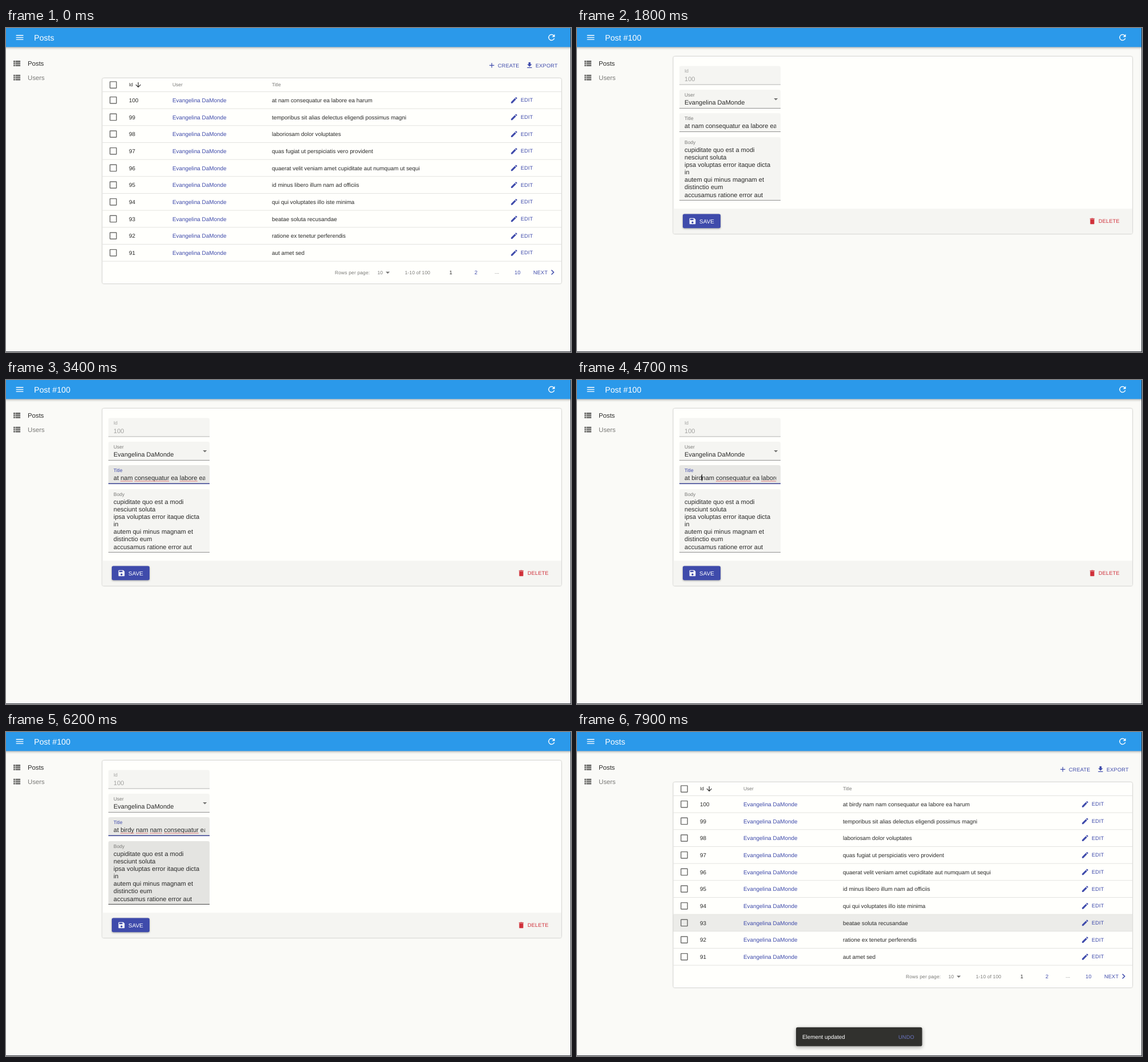
Animation of 988 by 567 pixels, one loop 8 s. Source, as an HTML page:

```html
<!DOCTYPE html>
<html lang="en">
<head>
<meta charset="utf-8">
<title>Posts admin</title>
<style>
  html, body { margin: 0; width: 100%; height: 100%; overflow: hidden; background: #fafaf7; }
  svg { display: block; width: 988px; height: 567px; }
  text {
    font-family: "Liberation Sans", Arial, sans-serif;
    text-rendering: geometricPrecision;
    white-space: pre;
  }
  .h6 { font-size: 14.1px; }
  .menu { font-size: 11.3px; }
  .cell { font-size: 9.9px; }
  .input { font-size: 11.03px; }
  .label { font-size: 8.48px; }
  .caption { font-size: 8.48px; letter-spacing: .14px; }
  .button { font-size: 9.19px; letter-spacing: .19px; }
  .save { font-size: 9.9px; letter-spacing: .1px; }
  .status { font-family: "Open Sans", "Noto Sans", sans-serif; font-size: 9.6px; }
  .bar { filter: drop-shadow(0 1.4px 2px rgba(0, 0, 0, .36)); }
  .paper { filter: drop-shadow(0 .8px .9px rgba(0, 0, 0, .36)); }
  .raised { filter: drop-shadow(0 1.3px 1.4px rgba(0, 0, 0, .36)); }
  .float { filter: drop-shadow(0 2px 3px rgba(0, 0, 0, .36)); }
</style>
</head>
<body>
<svg id="stage" viewBox="0 0 988 567" xmlns="http://www.w3.org/2000/svg"></svg>
<script>
const LOOP = 8000, STEP = 100;
const OPEN = 1700, SAVED = 7700;
const INK = '#2b2b2a', GREY = '#7a7a78', PALE = '#a3a3a0', PAPER = '#fffffc';
const INDIGO = '#3f4bab', RED = '#d0303a', WHITE = '#fff';
const USER = 'Evangelina DaMonde';
const TAIL = 'nam consequatur ea labore ea harum';
const TYPED = 'birdy nam ';
const TITLES = [
  'at ' + TAIL,
  'temporibus sit alias delectus eligendi possimus magni',
  'laboriosam dolor voluptates',
  'quas fugiat ut perspiciatis vero provident',
  'quaerat velit veniam amet cupiditate aut numquam ut sequi',
  'id minus libero illum nam ad officiis',
  'qui qui voluptates illo iste minima',
  'beatae soluta recusandae',
  'ratione ex tenetur perferendis',
  'aut amet sed'
];
const BODY = [
  'cupiditate quo est a modi', 'nesciunt soluta', 'ipsa voluptas error itaque dicta', 'in',
  'autem qui minus magnam et', 'distinctio eum', 'accusamus ratione error aut'
];
const ICONS = {
  menu: 'M3 18h18v-2H3zm0-5h18v-2H3zm0-7v2h18V6z',
  refresh: 'M17.65 6.35A8 8 0 1 0 19.73 14h-2.08A6 6 0 1 1 12 6c1.66 0 3.14.69 4.22 1.78L13 11h7V4z',
  list: 'M4 14h4v-4H4zm0 5h4v-4H4zM4 9h4V5H4zm5 5h12v-4H9zm0 5h12v-4H9zM9 5v4h12V5z',
  box: 'M19 5v14H5V5h14m0-2H5a2 2 0 0 0-2 2v14a2 2 0 0 0 2 2h14a2 2 0 0 0 2-2V5a2 2 0 0 0-2-2z',
  down: 'M20 12l-1.41-1.41L13 16.17V4h-2v12.17l-5.58-5.59L4 12l8 8z',
  add: 'M19 13h-6v6h-2v-6H5v-2h6V5h2v6h6z',
  load: 'M19 9h-4V3H9v6H5l7 7zM5 18v2h14v-2z',
  edit: 'M3 17.25V21h3.75L17.81 9.94l-3.75-3.75zM20.71 7.04a1 1 0 0 0 0-1.41l-2.34-2.34a1 1 0 0 0-1.41 0l-1.83 1.83 3.75 3.75z',
  drop: 'M7 10l5 5 5-5z',
  next: 'M10 6L8.59 7.41 13.17 12l-4.58 4.59L10 18l6-6z',
  save: 'M17 3H5a2 2 0 0 0-2 2v14a2 2 0 0 0 2 2h14a2 2 0 0 0 2-2V7zm-5 16a3 3 0 1 1 0-6 3 3 0 0 1 0 6zm3-10H5V5h10z',
  bin: 'M6 19a2 2 0 0 0 2 2h8a2 2 0 0 0 2-2V7H6zM19 4h-3.5l-1-1h-5l-1 1H5v2h14z'
};

const text = (x, y, str, cls, fill = INK, more = '') =>
  `<text x="${x}" y="${y}" class="${cls}" fill="${fill}" ${more}>${str}</text>`;
const rect = (x, y, w, h, fill, more = '') =>
  `<rect x="${x}" y="${y}" width="${w}" height="${h}" fill="${fill}" ${more}/>`;
const icon = (name, cx, cy, size, fill) =>
  `<path d="${ICONS[name]}" fill="${fill}" transform="translate(${cx - size / 2} ${cy - size / 2}) scale(${size / 24})"/>`;

const rowTop = i => 111.5 + 29.67 * i;

function frameParts() {
  return rect(0, 0, 988, 567, '#fafaf7') +
    rect(-6, -6, 1000, 39.3, '#2b99ea', 'class="bar"') +
    icon('menu', 24, 16.6, 17, WHITE) +
    text(49, 21.6, 'Posts', 'h6', WHITE, 'id="heading"') +
    icon('refresh', 954, 16.5, 17, WHITE) +
    icon('list', 18.7, 62, 17, '#727270') + text(38, 66, 'Posts', 'menu') +
    icon('list', 18.7, 86.8, 17, '#727270') + text(38, 90.7, 'Users', 'menu', GREY);
}

function row(title, i) {
  const y = rowTop(i), mid = y + 14.8;
  return rect(168.5, y + .5, 802.5, 29.2, '#000', `id="row${i}" opacity="0"`) +
    (i ? '' : rect(877, 116, 50, 20.3, INDIGO, 'id="press" rx="2.8" opacity="0"')) +
    rect(168.5, y + 29.17, 802.5, .9, '#e0e0dd') +
    icon('box', 187.5, mid, 17, '#6c6c6a') +
    text(215, mid + 3.7, 100 - i, 'cell') +
    text(291, mid + 3.7, USER, 'cell', INDIGO) +
    text(465, mid + 3.7, title, 'cell', INK, `id="title${i}"`) +
    icon('edit', 888.5, mid, 14.2, INDIGO) +
    text(900, mid + 3, 'EDIT', 'button', INDIGO);
}

function listPage() {
  const mid = 'text-anchor="middle"';
  return '<g id="list">' +
    icon('add', 849.5, 65.3, 14.2, INDIGO) + text(860, 68.6, 'CREATE', 'button', INDIGO) +
    icon('load', 915.5, 65.3, 14.2, INDIGO) + text(926, 68.6, 'EXPORT', 'button', INDIGO) +
    rect(168.5, 88, 802.5, 359, PAPER, 'rx="2.8" class="paper"') +
    icon('box', 187.5, 99.5, 17, '#6c6c6a') +
    text(215, 102.4, 'Id', 'label') + icon('down', 231.2, 99.6, 14, INK) +
    text(291, 102.4, 'User', 'label', GREY) + text(465, 102.4, 'Title', 'label', GREY) +
    rect(168.5, 111, 802.5, .9, '#e0e0dd') +
    TITLES.map(row).join('') +
    text(575, 430.6, 'Rows per page:', 'caption', GREY) +
    text(649.5, 430.6, '10', 'caption', GREY) + icon('drop', 667.5, 427.8, 17, '#727270') +
    text(697.5, 430.6, '1-10 of 100', 'caption', GREY) +
    text(778, 430.7, '1', 'button', INK, mid) + text(822, 430.7, '2', 'button', INDIGO, mid) +
    text(858.5, 430.2, '...', 'button', GREY, mid) + text(894.5, 430.7, '10', 'button', INDIGO, mid) +
    text(922, 430.7, 'NEXT', 'button', INDIGO) + icon('next', 955.8, 427.6, 18, INDIGO) +
    '</g>';
}

function field(id, name, y, h, tone = GREY, line = .45) {
  return `<path id="${id}" d="M179 ${y + h}V${y + 2.8}q0-2.8 2.8-2.8H353.2q2.8 0 2.8 2.8V${y + h}z" fill-opacity=".04"/>` +
    rect(179, y + h - .9, 177, .9, '#000', `id="${id}Line" opacity="${line}"`) +
    text(188, y + 11.8, name, 'label', tone, `id="${id}Label"`);
}

function formPage() {
  return '<g id="form">' +
    rect(168.5, 50, 802.5, 310, PAPER, 'rx="2.8" class="paper"') +
    '<path d="M168.5 316.3H971V357.2q0 2.8-2.8 2.8H171.3q-2.8 0-2.8-2.8z" fill="#f5f5f2"/>' +
    field('idBox', 'Id', 66.5, 33, PALE, .3) + text(188, 92.8, '100', 'input', PALE) +
    field('userBox', 'User', 108, 33) + text(188, 134, USER, 'input') +
    icon('drop', 347.7, 124.3, 17, '#727270') +
    field('titleBox', 'Title', 149, 33) +
    rect(179, 180.6, 177, 1.5, '#343c90', 'id="focus"') +
    '<g clip-path="url(#inner)">' + text(188, 175.3, '', 'input', INK, 'id="value"') +
    '<path id="spell" stroke="#d8403c" stroke-width="1" stroke-dasharray="1.4 .7" fill="none"/></g>' +
    rect(0, 165, 1, 12, INK, 'id="caret"') +
    field('bodyBox', 'Body', 191, 111) +
    BODY.map((line, i) => text(188, 216.8 + 13.12 * i, line, 'input')).join('') +
    rect(185, 325.5, 66, 24.8, INDIGO, 'id="save" rx="2.8" class="raised"') +
    icon('save', 202, 338, 14.2, WHITE) + text(214, 341.6, 'SAVE', 'save', WHITE) +
    icon('bin', 901, 338, 14.2, RED) + text(912, 341.2, 'DELETE', 'button', RED) +
    '</g>';
}

function overlays() {
  return '<g id="snack">' + rect(383, 516.7, 220.5, 33, '#31312e', 'rx="2.8" class="float"') +
    text(394, 536.8, 'Element updated', 'cell', WHITE) +
    text(562, 536.5, 'UNDO', 'button', '#6b75c2') + '</g>' +
    '<g id="status"><path d="M0 551H325q2 0 2 2V567H0z" fill="#31363f"/>' +
    text(2.5, 562.5, '', 'status', '#b9bcc0', 'id="address"') + '</g>' +
    rect(987, 0, 1, 567, '#33373f') + rect(0, 566, 988, 1, '#33373f');
}

document.getElementById('stage').innerHTML =
  '<defs><clipPath id="inner"><rect x="187" y="160" width="161.3" height="20"/></clipPath></defs>' +
  frameParts() + listPage() + formPage() + overlays();

const el = {};
document.querySelectorAll('[id]').forEach(node => el[node.id] = node);

const pen = document.createElement('canvas').getContext('2d');
pen.font = '110.3px "Liberation Sans", Arial, sans-serif';
const width = str => pen.measureText(str).width / 10;

const set = (id, name, value) => el[id].setAttribute(name, value);
const show = (id, on) => set(id, 'display', on ? 'inline' : 'none');
const write = (id, str) => { if (el[id].textContent !== str) el[id].textContent = str; };
const ramp = (t, a, b) => {
  const k = Math.min(1, Math.max(0, (t - a) / (b - a)));
  return k * k * (3 - 2 * k);
};
const within = (t, a, b) => t >= a && t < b;
const mix = (a, b, k) => `rgb(${a.map((v, i) => Math.round(v + (b[i] - v) * k))})`;

// Characters present after each key press.
const KEYS = [[4400, 3], [4700, 4], [4800, 5], [5000, 6], [5100, 7], [5200, 8], [5300, 9], [5500, 10]];
const typedAt = t => KEYS.reduce((n, [at, count]) => t >= at ? count : n, 0);

// Marks unknown words, except the one being typed.
function spellPath(value, caret, editing) {
  let d = '';
  for (const m of value.matchAll(/\w{3,}/g)) {
    const end = m.index + m[0].length;
    if (editing && m.index < caret && end >= caret) continue;
    const x = 188 + width(value.slice(0, m.index));
    d += `M${x} 177h${width(m[0])}`;
  }
  return d;
}

function drawList(t) {
  set('row0', 'opacity', within(t, 500, OPEN) ? .075 : 0);
  set('row7', 'opacity', .075 * ramp(t, 7600, 7900));
  const press = t < 1400 ? .04 * ramp(t, 600, 1000) : .1 + .12 * ramp(t, 1400, 1800);
  set('press', 'opacity', t < OPEN ? press : 0);
  write('title0', 'at ' + (t >= SAVED ? TYPED : '') + TAIL);
}

function drawForm(t) {
  const n = typedAt(t), head = 'at ' + TYPED.slice(0, n), value = head + TAIL;
  const hover = ramp(t, 1950, 2200), focus = ramp(t, 2300, 2600);
  write('value', value);
  set('titleBox', 'fill-opacity', .04 + .09 * hover - .04 * focus);
  set('titleBoxLine', 'opacity', .45 + .42 * hover);
  set('titleBoxLabel', 'fill', mix([122, 122, 120], [63, 75, 171], focus));
  set('focus', 'transform', `translate(${267.5 * (1 - focus)} 0) scale(${focus} 1)`);
  set('spell', 'd', t >= 2500 ? spellPath(value, head.length, n > 0 && n < TYPED.length) : '');
  set('caret', 'x', Math.floor(188 + width(head)));
  show('caret', within(t, 2400, 3400) || within(t, 4400, 6000) || within(t, 6500, 7200));

  const over = ramp(t, 6000, 6300) - ramp(t, 6300, 6550);
  set('bodyBox', 'fill-opacity', .04 + .09 * over);
  set('bodyBoxLine', 'opacity', .45 + .42 * over);
  set('save', 'fill', mix([63, 75, 171], [45, 56, 148], ramp(t, 6300, 6600)));
}

function draw(t) {
  const editing = within(t, OPEN, SAVED);
  show('list', !editing);
  show('form', editing);
  write('heading', editing ? 'Post #100' : 'Posts');
  if (editing) drawForm(t); else drawList(t);

  show('status', within(t, 700, 1800) || within(t, 7500, 7800));
  write('address', t < 4000 ? 'shelftest:4100/#/posts/100' : 'Waiting for shelftest…');

  const pop = ramp(t, 7600, 7900), size = .75 + .25 * pop;
  show('snack', t >= SAVED);
  set('snack', 'opacity', pop);
  set('snack', 'transform', `translate(493.2 533.2) scale(${size}) translate(-493.2 -533.2)`);
}

const start = performance.now();
function tick() {
  const t = Math.max(0, performance.now() - start) % LOOP;
  draw(Math.floor(t / STEP) * STEP);
  requestAnimationFrame(tick);
}
tick();
</script>
</body>
</html>
```
